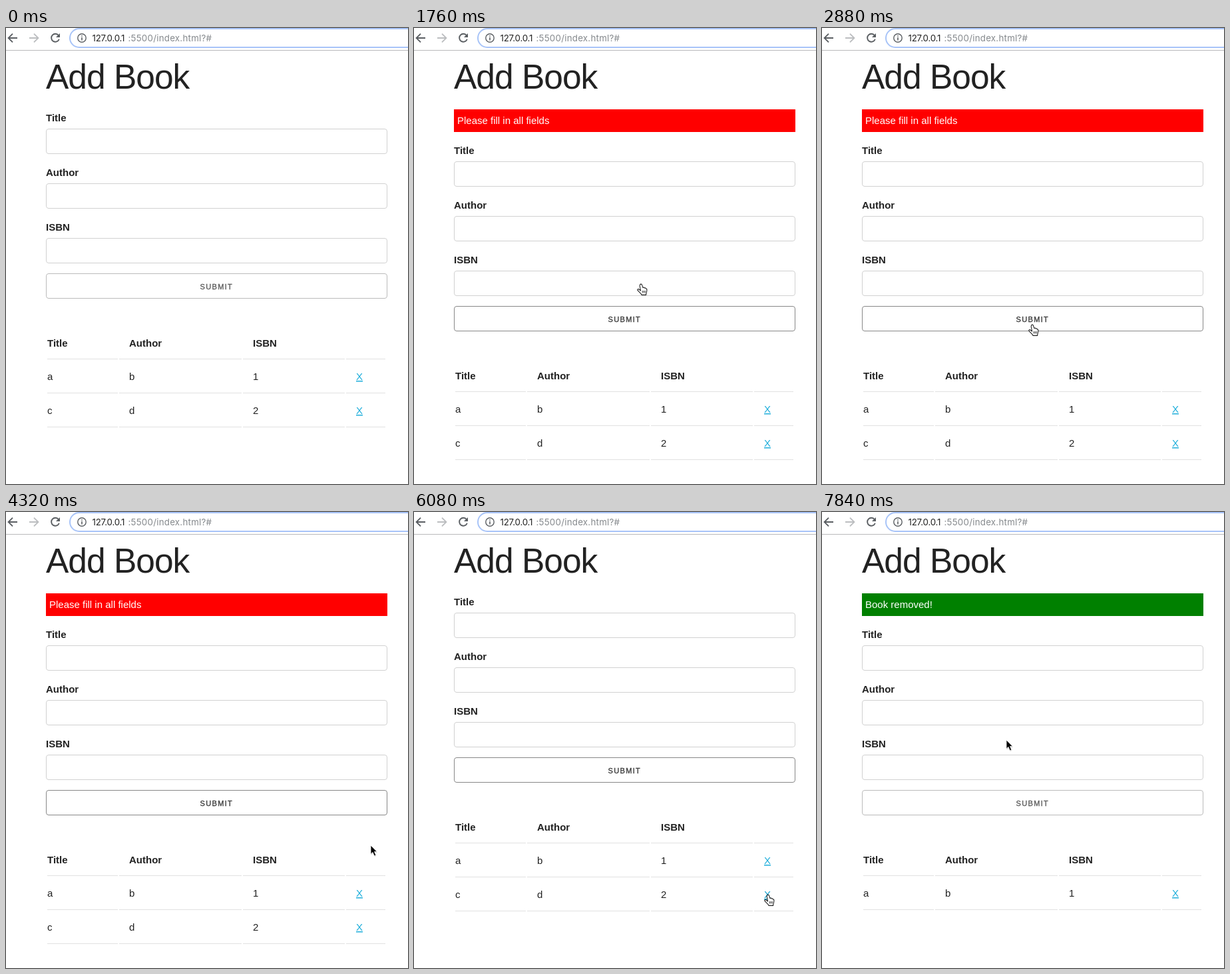
These frames come from a looping animation (604x684 px, 8 s). An HTML page:

```html
<!DOCTYPE html>
<html lang="en">
<head>
<meta charset="utf-8">
<title>Add Book</title>
<style>
  html, body { margin: 0; width: 100%; height: 100%; overflow: hidden; background: #fff; }
  svg { display: block; }
  text { font: 15px "Liberation Sans", Arial, sans-serif; fill: #222; }
  .bold { font-weight: 700; }
  .heading { font-size: 51.5px; letter-spacing: -1px; }
  .url { font: 13.3px Inter, sans-serif; letter-spacing: -.2px; }
  .path { fill: #85898d; letter-spacing: .25px; }
  .field { fill: #fff; stroke: #d1d1d1; }
  .button rect { fill: #fff; stroke: #bbb; }
  .button text {
    font-size: 11px; letter-spacing: 1.35px;
    fill: #555; stroke: #555; stroke-width: .3px;
  }
  .button.active rect { stroke: #888; }
  .button.active text { fill: #333; stroke: #333; }
  .rule { stroke: #e1e1e1; }
  .link { fill: #1eaedb; text-decoration: underline; }
  .link.hover { fill: #0fa0ce; }
  .notice text { fill: #fff; }
  .icon { fill: none; stroke: #5a5e62; stroke-width: 1.9; }
</style>
</head>
<body>
<svg id="stage" width="604" height="684" viewBox="0 0 604 684">
  <rect width="604" height="684" fill="#fff"/>

  <g id="toolbar">
    <path d="M0 33.5H604" stroke="#b9b9bb"/>
    <path class="icon" d="M17 15H4M10 8.6L3.6 15L10 21.4"/>
    <path class="icon" style="stroke:#bcbec0" d="M35 15H48M42 8.6L48.4 15L42 21.4"/>
    <path class="icon" d="M79 11.2A6 6 0 1 0 79.8 16.8"/>
    <path d="M81 8V14H75Z" fill="#5a5e62"/>
    <rect x="96" y="1" width="640" height="28" rx="14" fill="#fff" stroke="#a8c4f8" stroke-width="2"/>
    <circle class="icon" cx="114" cy="15" r="6.2" style="stroke-width:1.4"/>
    <path d="M114 14V18.6M114 11.2V12.8" stroke="#5a5e62" stroke-width="1.6"/>
    <text class="url" x="129.5" y="20">127.0.0.1</text>
    <text class="url path" x="183.5" y="20">:5500/index.html?#</text>
  </g>

  <text class="heading" x="60" y="91">Add Book</text>

  <g id="notice" class="notice">
    <rect id="noticeBox" x="60" y="122" width="513" height="34"/>
    <text id="noticeText" x="65" y="144"></text>
  </g>

  <g id="page">
    <g id="form"></g>
    <g id="submit" class="button">
      <rect x="60.5" y="368.5" width="512" height="37" rx="3.5"/>
      <text x="291.5" y="392">SUBMIT</text>
    </g>
    <g id="table"></g>
  </g>

  <g id="cursor">
    <g id="arrow">
      <path d="M.5 1.5V14.5L3.5 11.8L5.8 17L8.2 16L6 11H10Z" fill="#000" opacity=".18"/>
      <path d="M0 0V13.2L3 10.4L5.3 15.8L7.8 14.8L5.5 9.6H9.4Z" fill="#000" stroke="#fff" stroke-width=".8"/>
    </g>
    <g id="beam" fill="none">
      <path id="beamShape" d="M-3.5 -7.3Q-.3 -7.3 0 -5.6Q.3 -7.3 3.5 -7.3M0 -5.6V5.6M-3.5 7.3Q-.3 7.3 0 5.6Q.3 7.3 3.5 7.3M-2 1.5H2" stroke="#555" stroke-width="1.3"/>
    </g>
    <g id="hand" stroke="#222" stroke-width="1.1" stroke-linejoin="round">
      <path fill="#fff" d="M-.4 1C.5 -.5 2 0 2.5 1.4L4 5.6C5 4.6 6.2 5.1 6.4 6.1C7.4 5.4 8.4 6.1 8.6 7.1C9.8 6.9 10 8 9.9 9C9.8 12 8.8 13 8.6 16.4H2C1.6 14.5 -2 12 -4 9.4C-4.8 8 -3 7 -1.6 8.2L.6 10L-.8 3Z"/>
      <path d="M3.3 10V13.4M5.3 10V13.4M7.3 10V13.4" stroke-width=".9"/>
    </g>
  </g>
</svg>
<script>
const LOOP = 8000;
const NOTICE_SHIFT = 49;
const $ = id => document.getElementById(id);

function add(parent, tag, attrs, text = "") {
  const el = document.createElementNS("http://www.w3.org/2000/svg", tag);
  for (const key in attrs) el.setAttribute(key, attrs[key]);
  el.textContent = text;
  return parent.appendChild(el);
}

// Form fields
["Title", "Author", "ISBN"].forEach((label, i) => {
  const y = 82 * i;
  add($("form"), "text", { class: "bold", x: 60, y: 140 + y }, label);
  add($("form"), "rect", { class: "field", x: 60.5, y: 151.5 + y, width: 512, height: 37, rx: 3.5 });
});

// Book list
const columns = [62, 185, 371, 526];
const cells = [[62, 168], [170, 354], [356, 509], [511, 570]];
const links = [];
const rows = [["Title", "Author", "ISBN"], ["a", "b", "1", "X"], ["c", "d", "2", "X"]].map((words, r) => {
  const row = add($("table"), "g", {});
  const y = r ? 477 + 51 * r : 478;
  words.forEach((word, c) => {
    const kind = r === 0 ? "bold" : c === 3 ? "link" : "";
    const el = add(row, "text", { class: kind, x: columns[c], y }, word);
    if (kind === "link") links.push(el);
  });
  const d = cells.map(([a, b]) => `M${a} ${496.5 + 51 * r}H${b}`).join("");
  add(row, "path", { class: "rule", d });
  return row;
});

// Pointer: time, shape, x, y
const moves = [
  [0, "", 0, 0],
  [160, "beam", 310, 237],
  [320, "arrow", 296, 203],
  [480, "beam", 283.5, 171],
  [800, "arrow", 308, 143],
  [960, "arrow", 338, 115],
  [1280, "beam", 338, 250],
  [1440, "beam", 338, 336],
  [1600, "hand", 340, 384],
  [1920, "beam", 340, 384],
  [2560, "beam", 335, 396],
  [2720, "hand", 324, 425],
  [2880, "hand", 315, 445],
  [3840, "arrow", 501.5, 483.5],
  [4160, "arrow", 532, 495],
  [4320, "arrow", 548, 500],
  [5280, "arrow", 551, 508],
  [5440, "arrow", 553.5, 524],
  [5600, "arrow", 552, 543],
  [5760, "arrow", 546, 559],
  [5920, "arrow", 538, 569],
  [6080, "hand", 531, 574],
  [7840, "arrow", 277, 342],
];

// Page: time, notice text, notice colour, button active, rows shown
const states = [
  [0, "", "", false, 3],
  [1600, "", "", true, 3],
  [1760, "Please fill in all fields", "#f00", true, 3],
  [4800, "", "", true, 3],
  [6400, "Book removed!", "#008000", false, 2],
];

const at = (steps, t) => steps.findLast(step => step[0] <= t);
const show = (el, on) => el.setAttribute("visibility", on ? "visible" : "hidden");

function draw(t) {
  const [, message, colour, active, shown] = at(states, t);
  $("noticeText").textContent = message;
  $("noticeBox").setAttribute("fill", colour || "none");
  $("page").setAttribute("transform", `translate(0 ${message ? NOTICE_SHIFT : 0})`);
  $("submit").classList.toggle("active", active);
  rows.forEach((row, i) => show(row, i < shown));

  const [, shape, x, y] = at(moves, t);
  for (const id of ["arrow", "beam", "hand"]) show($(id), id === shape);
  $("cursor").setAttribute("transform", `translate(${x} ${y})`);
  const over = shape === "hand" && x > 525 ? shown - 2 : -1;
  links.forEach((link, i) => link.classList.toggle("hover", i === over));
}

const start = performance.now();
function tick() {
  draw((performance.now() - start) % LOOP);
  requestAnimationFrame(tick);
}
tick();
</script>
</body>
</html>
```
